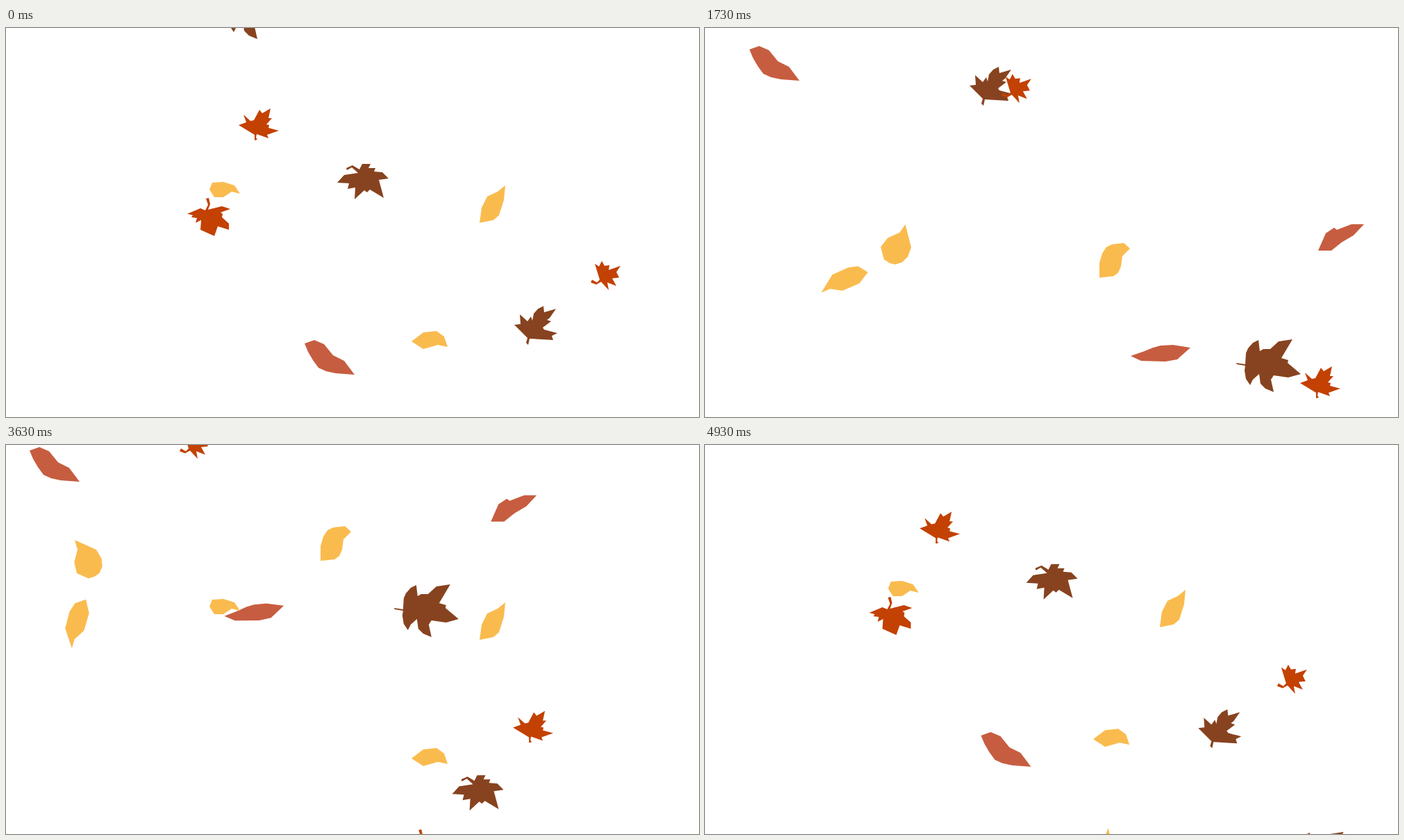
Recreate the animation shown at these times as an HTML page. Size 998x561 px, loop 5010 ms.

```html
<!DOCTYPE html>
<html lang="en">
<head>
<meta charset="utf-8">
<title>Falling leaves</title>
<style>
  html, body { margin: 0; width: 100%; height: 100%; overflow: hidden; background: #fff; }
  svg { display: block; width: 100vw; height: 100vh; }
</style>
</head>
<body>
<svg id="stage" viewBox="0 0 998 561" preserveAspectRatio="none"></svg>
<script>
const LOOP = 5010, STEPS = 100;
const BROWN = '#87431f', ORANGE = '#c34103', RED = '#c75d40', YELLOW = '#fabb4e';

// A leaf's own clock p for each pass. The first pass runs across the loop's end;
// the second begins a little past the middle and is slightly faster.
const first = n => n;
const wrapped = n => n - STEPS - 0.5;
const second = n => (n - 55) * 1.025;
const late = n => n - 73;
const FIRST = [first, wrapped], SECOND = [second];
const BOTH = [...FIRST, second], LATE = [...FIRST, late];

const spin = (rate, zero) => p => rate * (p - zero);
const still = () => 0;

const svg = document.getElementById('stage');
const drops = [];

// path: a few way points [p, x, y]
function leaf(color, outline, passes, path, turn = still) {
  for (const clock of passes) {
    const el = document.createElementNS('http://www.w3.org/2000/svg', 'polygon');
    el.setAttribute('points', outline);
    el.setAttribute('fill', color);
    svg.append(el);
    drops.push({ el, clock, path, turn });
  }
}

const wideMaple = '13,6 22,2 32,8 36,0 48,0 45,6 55,6 53,11 65,12 74,21 60,23 67,49 47,37 43,41 39,38 25,51 26,34 15,36 17,28 0,27 10,16 30,13 21,5 14,9';
const forkedMaple = '0,27 9,26 8,12 19,22 24,15 26,21 28,11 34,4 42,0 43,9 60,4 51,17 47,20 53,22 41,31 43,34 62,39 54,43 56,49 22,47 20,56 17,53 19,46';
const bigMaple = '0,34 13,36 14,20 17,13 24,5 32,1 34,17 39,14 49,14 61,3 81,0 65,27 75,30 74,34 93,50 75,55 54,52 50,58 54,76 42,71 35,64 33,50 24,58 20,66 14,57 12,45 13,38 1,36';
const spikyMaple = '0,24 11,20 7,9 17,18 22,17 30,2 34,7 46,0 43,14 48,14 40,23 44,24 43,28 58,32 41,38 43,43 26,37 25,42 27,45 23,46 23,38';
const hangingMaple = '27,0 31,-1 33,8 30,16 50,11 62,15 48,20 51,22 50,27 60,36 60,45 44,40 39,54 19,45 20,31 12,35 14,28 6,27 8,24 0,22 19,14 26,17 30,9';
const smallMaple = '1,31 3,27 10,31 14,27 7,4 13,8 17,0 21,7 28,6 27,13 44,7 38,16 42,24 32,25 38,36 25,31 27,42 16,30 9,34';
const bentBlade = '0,5 14,0 28,6 41,22 57,30 72,50 45,48 31,45 20,40 12,29 5,17';
const nickedBlade = '0,38 11,13 23,5 27,8 48,0 66,0 51,16 34,26 19,38';
const slimBlade = '-43,6 -23,-1 -11,-6 0,-9 18,-10 43,-6 24,11 7,14 -28,13';
const curvedOval = '0,50 0,29 4,15 10,6 18,2 35,0 44,8 33,19 31,34 27,43 20,48';
const drop = '13,-33 22,0 17,14 9,22 -1,25 -9,23 -17,18 -22,0 -12,-13 5,-21';
const longOval = '-11,35 -20,6 -13,-18 -5,-30 11,-35 15,-15 7,10 -7,22';
const tallOval = '37,0 35,21 28,43 20,50 0,54 3,32 11,16 26,9';
const flatOval = '0,15 17,2 36,0 47,8 52,23 38,20 17,26';
const hook = '0,11 4,1 20,0 36,5 44,17 32,14 20,22 7,22';

leaf(BROWN, wideMaple, BOTH, [[-12.5, 350, -18], [0, 477, 196], [18.5, 643, 477]]);
leaf(BROWN, forkedMaple, BOTH, [[-20.5, 381, 56], [-12.5, 527, 205], [-7.2, 626, 304], [0, 732, 401]]);
leaf(BROWN, bigMaple, BOTH, [[0, 308, -60], [19, 566, 209], [35, 765, 449], [45, 838, 557]]);

leaf(ORANGE, spikyMaple, FIRST, [[0, 335, 116], [19, 662, 367], [35, 857, 488], [48, 955, 534]]);
leaf(ORANGE, spikyMaple, SECOND, [[-7.2, 243, 25], [18.5, 731, 384], [33.8, 944, 514]]);
leaf(ORANGE, hangingMaple, BOTH, [[-12.5, 59, 22], [0, 261, 246], [18.5, 568, 556]]);
leaf(ORANGE, smallMaple, BOTH, [[-27.5, 249, -22], [-12.5, 624, 168], [-7.2, 735, 240], [0, 841, 336], [11, 939, 468]]);

leaf(RED, bentBlade, BOTH, [[-27.5, 34, 3], [-20.5, 64, 26], [-12.5, 210, 220], [-7.2, 278, 283], [0, 430, 450]]);
leaf(RED, nickedBlade, FIRST, [[19, 670, 88], [35, 883, 283], [48, 980, 403]]);
leaf(RED, nickedBlade, SECOND, [[18.5, 699, 73], [33.8, 932, 262]]);
leaf(RED, slimBlade, FIRST, [[19, 409, 228], [35, 656, 467]], spin(-3, 35));
leaf(RED, slimBlade, SECOND, [[18.5, 358, 240], [33.8, 584, 492]], spin(-3, 17.8));

leaf(YELLOW, curvedOval, BOTH, [[-27.5, 453, 117], [-20.5, 568, 310], [-12.5, 674, 502]]);
leaf(YELLOW, drop, BOTH, [[-27.5, 116, 168], [-20.5, 275, 316], [-12.5, 442, 519]], spin(7.3, -20.6));
leaf(YELLOW, longOval, BOTH, [[-37, 8, 77], [-27.5, 105, 258], [-20.5, 201, 367], [-12.5, 363, 476], [-7.2, 461, 529]], spin(7.2, -27.3));
leaf(YELLOW, tallOval, LATE, [[-12.5, 433, 53], [0, 682, 227], [15, 913, 371], [19, 951, 392]]);
leaf(YELLOW, flatOval, LATE, [[-12.5, 377, 206], [0, 584, 437]]);
leaf(YELLOW, hook, LATE, [[-12.5, 91, 16], [0, 293, 222], [15, 655, 498], [19, 725, 551]]);

// Speed along axis c at way point i, from its neighbours.
function slope(path, i, c) {
  const a = path[Math.max(i - 1, 0)], b = path[Math.min(i + 1, path.length - 1)];
  return (b[c] - a[c]) / (b[0] - a[0]);
}

// Smooth curve through the way points, straight beyond both ends.
function along(path, p, c) {
  const last = path.length - 1;
  const end = p <= path[0][0] ? 0 : p >= path[last][0] ? last : -1;
  if (end >= 0) return path[end][c] + slope(path, end, c) * (p - path[end][0]);
  const j = path.findIndex(point => point[0] > p), i = j - 1;
  const d = path[j][0] - path[i][0];
  const u = (p - path[i][0]) / d, v = 1 - u;
  return v * v * ((1 + 2 * u) * path[i][c] + u * d * slope(path, i, c))
    + u * u * ((1 + 2 * v) * path[j][c] - v * d * slope(path, j, c));
}

// Two uneven steps in every 100 ms: 30 ms, then 70 ms.
function stepAt(ms) {
  return Math.min(2 * Math.floor(ms / 100) + (ms % 100 >= 30 ? 1 : 0), STEPS - 1);
}

function render(ms) {
  const step = stepAt(ms);
  for (const { el, clock, path, turn } of drops) {
    const p = clock(step);
    const x = along(path, p, 1).toFixed(2), y = along(path, p, 2).toFixed(2);
    el.setAttribute('transform', `translate(${x} ${y}) rotate(${turn(p).toFixed(2)})`);
  }
}

let start;
function tick(now) {
  if (start === undefined) start = now;
  render(Math.max(now - start, 0) % LOOP);
  requestAnimationFrame(tick);
}
render(0);
requestAnimationFrame(tick);
</script>
</body>
</html>
```
